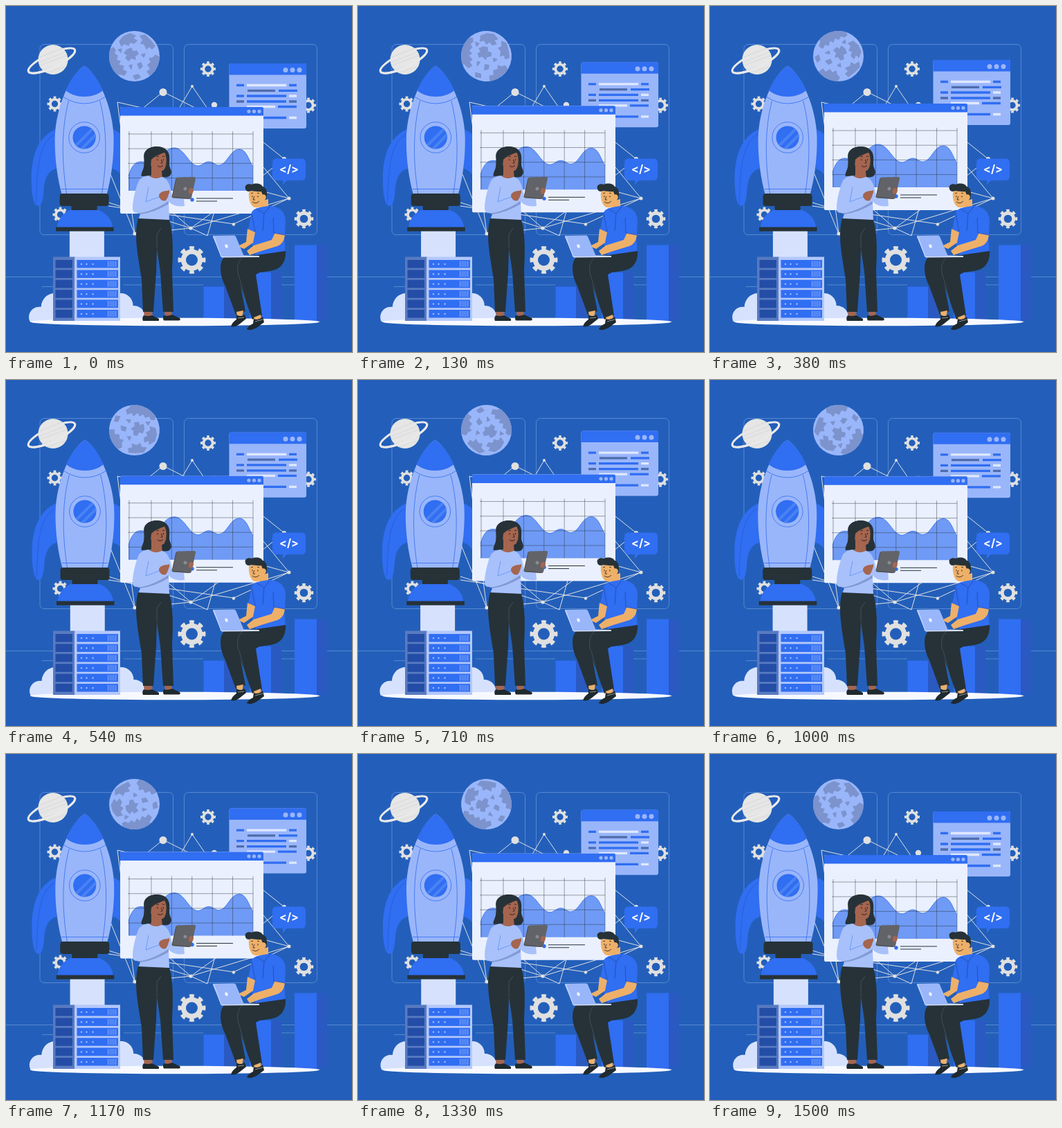
An HTML page for the animation above (1540 ms loop, 500 by 500 pixels).

```html
<!DOCTYPE html>
<html lang="en">
<head>
<meta charset="utf-8">
<title>Startup launch</title>
<style>
  html, body { margin: 0; width: 100%; height: 100%; overflow: hidden; background: #235fba; }
  svg { display: block; width: 100vw; height: 100vh; }
  .blue { fill: #306ef2; }
  .sky { fill: #9ab6fa; }
  .pale { fill: #d6e2fd; }
  .dark { fill: #263238; }
  .grey { fill: #e0e0e0; }
  .side { fill: #2a59c2; }
  .brown { fill: #a5654f; }
  .skin { fill: #eeb069; }
  .line { fill: none; stroke: #306ef2; stroke-width: .8; }
  .seam { fill: none; stroke: #1c3f94; stroke-width: .6; }
  .crease { fill: none; stroke: #53636b; stroke-width: .6; }
  .frame { fill: none; stroke: #6f98dc; stroke-width: .7; }
  .net { fill: none; stroke: #e0e0e0; stroke-width: 1; }
  text { font: 700 16px Inter, "Open Sans", sans-serif; fill: #fff; text-anchor: middle; }
</style>
</head>
<body>
<svg viewBox="0 0 500 500">
  <defs>
    <g id="gear" fill="none" stroke="#e0e0e0">
      <circle r="6.5" stroke-width="3.8"/>
      <circle r="9.100" stroke-width="3.400" pathLength="16" stroke-dasharray="1" stroke-dashoffset=".5"/>
    </g>
    <path id="fin" d="M73 178C50 187 38 210 37 247C37 268 39 285 45 288.500C52 291 54 280 55 265C56 250 61 238 73 235Z"/>
    <clipPath id="moonClip"><circle cx="185.500" cy="72.500" r="36.500"/></clipPath>
    <clipPath id="planetClip"><circle cx="68" cy="77.500" r="21.500"/></clipPath>
    <clipPath id="portClip"><circle cx="113.500" cy="190" r="16.800"/></clipPath>
  </defs>

  <g class="frame">
    <rect x="49" y="55.500" width="192.500" height="275" rx="6"/>
    <rect x="257.500" y="55.500" width="192" height="275" rx="6"/>
    <path d="M0 391.500H500M52 405.500H70M170 403H285M398 403H417"/>
  </g>

  <g id="planet">
    <ellipse cx="66" cy="79" rx="37" ry="10" transform="rotate(-25 66 79)" fill="none" stroke="#e9e9e9" stroke-width="3"/>
    <circle cx="68" cy="77.500" r="21.500" fill="#e6e6e6"/>
    <path clip-path="url(#planetClip)" d="M44 76L88 58M46 82L92 64M46 87L92 70M50 94L92 79M54 98L92 86" fill="none" stroke="#d8d8d8" stroke-width="1"/>
    <path d="M-37 0A37 10 0 0 0 37 0" transform="translate(66 79) rotate(-25)" fill="none" stroke="#e9e9e9" stroke-width="3"/>
  </g>

  <g id="moon">
    <circle cx="185.500" cy="72.500" r="36.500" class="sky"/>
    <g clip-path="url(#moonClip)" fill="#7c93cd" stroke="#7c93cd" stroke-width="1.500" stroke-linejoin="round">
      <path d="M149 64L155 60L158 64L156 69L161 72L159 78L165 80L162 85L170 87L168 92L174 95L171 100L164 98L158 101L149 88Z"/>
      <path d="M170 44L179 40L187 43L183 47L189 50L185 54L179 52L177 57L171 54L167 58L164 51Z"/>
      <path d="M175 63L181 61L183 66L189 65L191 69L186 73L187 77L181 75L177 79L173 75L176 71L171 68Z"/>
      <path d="M194 43L201 42L209 50L215 58L211 62L207 58L203 62L200 55L195 54L198 49Z"/>
      <path d="M222 74L216 71L212 75L207 76L210 81L205 85L209 91L204 95L208 100L216 94Z"/>
      <path d="M190 84L195 82L197 87L193 91ZM184 101L191 99L194 103L187 106ZM196 70L201 69L199 74ZM162 63L167 62L166 67ZM178 86L182 85L181 91Z"/>
    </g>
  </g>

  <use href="#gear" transform="translate(292 91) scale(1.020)"/>
  <use href="#gear" transform="translate(70.500 141.500) scale(1.020)"/>
  <use href="#gear" transform="translate(437 143.500) scale(1.020)"/>
  <use href="#gear" transform="translate(78.500 301.500) scale(1.020)"/>
  <use href="#gear" transform="translate(430.500 307.500) scale(1.270)"/>
  <use href="#gear" transform="translate(268.500 367) scale(1.850)"/>

  <path class="net" d="M186 329L148 236M186 329L161 139L205 149M195 150L227 124L275 148M250 148L269 116L291 148
    M148 284L267 321L409 278M148 289L329 315L409 278L350 262M186 329L267 321L291 332L303 290M267 321L225 285M267 321L310 290M186 329L225 290
    M409 278L372 233M372 197L402 221L370 246M402 221L432 250"/>
  <g class="grey">
    <circle cx="227" cy="124.500" r="5.500"/><circle cx="269" cy="116" r="2"/><circle cx="301" cy="143" r="4.200"/>
    <circle cx="186" cy="329" r="2.600"/><circle cx="267" cy="321" r="2.600"/><circle cx="329" cy="315.500" r="2.200"/>
    <circle cx="409" cy="278" r="2.500"/><circle cx="402" cy="221" r="3"/>
  </g>

  <g class="shake"><g transform="translate(-.4 0)">
    <path class="pale" d="M35 456C30 445 39 433 51 435C52 419 67 411 80 417L164 415C175 414 184 422 184 433C197 433 204 444 201 456Z"/>
    <path class="pale" d="M92.300 324H142.300V370H92.300Z"/>
    <use href="#fin" class="blue"/>
    <use href="#fin" class="blue" transform="matrix(-1 0 0 1 227 0)"/>
    <path class="seam" d="M70 186C52 196 45 220 44 284" opacity=".5"/>
    <path class="sky" d="M113.500 86.500C94 98 71 147 71 194C71 224 75 250 81 272H146C152 250 156 224 156 194C156 147 133 98 113.500 86.500Z"/>
    <path class="blue" d="M113.500 86.500C103 93 93 107 86.500 122C101 134 126 134 140.500 122C134 107 124 93 113.500 86.500Z"/>
    <path class="line" d="M82.500 131Q113.500 151 144.500 131M91 137C81 175 80 220 88 271M136 137C146 175 147 220 139 271M80 264.500H147"/>
    <circle cx="113.500" cy="190" r="22.300" class="sky"/>
    <circle cx="113.500" cy="190" r="22.300" class="line"/>
    <g clip-path="url(#portClip)">
      <circle cx="113.500" cy="190" r="16.800" class="blue"/>
      <path d="M98 205L129 174M107 209L134 182" stroke="#4a82f4" stroke-width="4"/>
    </g>
    <path class="blue" d="M95 294H132C147 299 154 310 154.500 321H74C75 310 81 299 95 294Z"/>
    <path class="dark" d="M95 286H132V295H95Z"/>
    <rect class="dark" x="78" y="271" width="71" height="18" rx="4"/>
    <path class="dark" d="M72.500 319.500H156V325.500H72.500Z"/>
  </g></g>

  <path class="side" d="M315 405.500H330V455H315ZM383 385H398V455H383ZM449 345.500H464V455H449Z"/>
  <path class="blue" d="M285.500 405.500H315V455H285.500ZM352 385H383V455H352ZM417 345.500H449V455H417Z"/>
  <ellipse cx="244" cy="456.500" rx="209" ry="5.800" fill="#f7f9ff"/>

  <g id="server">
    <path fill="#587ac0" d="M68 362.500H100V455H68Z"/>
    <path fill="#b3c8fb" d="M99 362.500H165V455H99Z"/>
  </g>

  <g class="float" id="code">
    <rect class="sky" x="322.500" y="83" width="111.500" height="94" rx="3"/>
    <path class="blue" d="M322.500 99.500V86Q322.500 83 325.500 83H431Q434 83 434 86V99.500Z"/>
    <g class="sky"><circle cx="404" cy="92.500" r="3.500"/><circle cx="414" cy="92.500" r="3.500"/><circle cx="424" cy="92.500" r="3.500"/></g>
    <g fill="none" stroke-width="3.300">
      <path stroke="#306ef2" d="M333 114.500H344M409 114.500H420M394 122.300H421M333 130H344M348 130H405M348 138H405M393 145.500H420M348 161.500H405"/>
      <path stroke="#dfe8fe" d="M348 114.500H405M409 130H420M348 145.500H389M409 161.500H420"/>
      <path stroke="#4f6cac" d="M349 122.300H389M333 138H344M409 138H420"/>
    </g>
  </g>

  <g class="float">
    <rect x="165" y="146" width="207" height="154" rx="2" fill="#eaf0fe"/>
    <path class="blue" d="M165 158.500V148Q165 146 167 146H370Q372 146 372 148V158.500Z"/>
    <g class="sky"><circle cx="351" cy="152.300" r="2.600"/><circle cx="358.500" cy="152.300" r="2.600"/><circle cx="366" cy="152.300" r="2.600"/></g>
    <path fill="#6f9af5" d="M177 267V246C182 228 189 225 195 225C207 225 211 233 218 226C226 216 232 205 243 205C258 205 264 230 277 231C284 231 286 225 293 225C300 225 302 231 309 230C320 228 324 207 337 207C348 207 351 224 357 232V267Z"/>
    <path class="line" d="M177 246C182 228 189 225 195 225C207 225 211 233 218 226C226 216 232 205 243 205C258 205 264 230 277 231C284 231 286 225 293 225C300 225 302 231 309 230C320 228 324 207 337 207C348 207 351 224 357 232"/>
    <path id="grid" fill="none" stroke="#263238" stroke-width=".45"/>
    <circle class="blue" cx="269" cy="280" r="2.700"/>
    <path d="M275 278H328M275 282H305" stroke="#263238" stroke-width="1"/>
  </g>

  <path class="blue" d="M391 220.500H427Q433 220.500 433 226.500V246Q433 252 427 252H406L400 258V252H391Q385 252 385 246V226.500Q385 220.500 391 220.500Z"/>
  <text x="409" y="241">&lt;/&gt;</text>

  <g id="woman">
    <path class="dark" d="M203 208C209 202 224 201 231 207C238 213 236 222 236 229C236 235 242 239 237 245C232 250 224 246 218 245L196 246C194 242 200 236 200 226C199 217 198 213 203 208Z"/>
    <path class="brown" d="M210 230L225 238L226 249L216 253L206 248L210 244Z M199 441H211L212 449H200Z M229 441H239L241 449H230Z"/>
    <path class="brown" d="M211 217C217 217 224 213 228 210C233 215 233 232 228 237C222 241 214 237 211 231C206 231 204 221 209 221Z"/>
    <path d="M219 221V223.500M227.500 221V223.500M219 231Q223 234 227 230.500M224.500 222L226 227H223.500M217 218L221 217M226 217L229 217.500" fill="none" stroke="#2b2222" stroke-width=".9"/>
    <path class="dark" d="M205 207C217 200 231 204 232 211C225 213 214 217 210 222L208 243L200 244C199 230 199 212 205 207Z"/>
    <path fill="#a8c1fb" d="M206 245C212 250 219 250 225 247C233 249 237 256 240 274L257 277L258 289C246 291 237 286 235 282L236 309H191L195 298L184 297C182 286 188 258 193 251C197 247 201 246 206 245Z"/>
    <path fill="#8299d4" d="M187 298Q214 295 235 282L235 286Q216 298 194 301Z"/>
    <path fill="#a8c1fb" d="M193 254C184 270 181 293 185 298C196 303 222 291 234 282L229 273L202 283L206 263Z"/>
    <path class="line" d="M206 262L202 283L229 273" opacity=".6"/>
    <path class="brown" d="M221 273C223 268 231 266 236 268L234 276L231 281C226 283 221 279 221 273Z"/>
    <path fill="#626368" d="M248 247.500L272 247Q274.500 247 274 249.500L268 277Q267.500 279 265 279L242 277.500Q239.500 277 240 275L245.500 250Q246 247.500 248 247.500Z"/>
    <path d="M246 249L240 276L265 278.500" fill="none" stroke="#45464a" stroke-width=".8"/>
    <circle cx="259" cy="264" r="2.500" fill="#8a8b90"/>
    <path class="brown" d="M264 265C266 262 271 262 271 267C270 272 266 273 264 270Z M230 268L236 266L236 271Z"/>
    <path class="dark" d="M191 307L236 309C241 325 242 352 240 382L242 442H227L223 384L218 350L217 385L213 442H198L196 395C191 362 184 330 191 307Z"/>
    <path class="crease" d="M218 350L218 330L224 321"/>
    <path fill="#1f292e" d="M199 447Q204 449 211 447L221 452V455H198Q196 451 199 447ZM228 447Q234 449 240 446L251 451Q253 454 250 454.500H228Q226 451 228 447Z"/>
  </g>

  <g id="man">
    <path class="skin" d="M364 283L379 279V293L368 297Z"/>
    <path class="skin" d="M351 268L371 265C377 268 378 275 374 278C373 288 367 292 360 291C353 290 350 278 351 268Z"/>
    <path class="dark" d="M346 264C344 258 351 256 355 258C362 255 369 257 371 261C378 263 378 273 376 280L372 276L369 268C362 269 356 266 351 268C348 268 346 266 346 264Z"/>
    <path class="skin" d="M369 274C372 270 378 274 375 279C373 282 369 281 369 278Z"/>
    <path d="M356 274V276.500M364 274V276.500M356 283Q361 287 366 282M359 275L357 280H360M354 271L357 270M363 270L366 271" fill="none" stroke="#3a2b22" stroke-width=".9"/>
    <path class="blue" d="M355 298C359 292 365 291 379 289C394 289 403 296 404 309L402 332L404 358L361 360C357 344 351 338 350 324Z"/>
    <path class="skin" d="M349 322L360 327L357 342L344 351L335 347L347 341Z"/>
    <g class="dark">
      <path d="M404 354C405 370 397 382 380 383L336 390L346 441L332 446L317 405C308 388 308 368 316 363L362 360Z"/>
      <path d="M362 360L390 372L361 388L370 447L356 453L343 416C334 392 330 376 335 367Z"/>
    </g>
    <path class="crease" d="M342 363C333 371 333 383 338 395L346 425"/>
    <path class="skin" d="M390 325L403 328C403 337 400 344 392 347L366 355L352 360L348 354L358 346L384 338Z"/>
    <path class="blue" d="M386 304L404 309L403 331L387 328Z"/>
    <path class="seam" d="M362 293L373 300L381 290M373 300L371 325M386 306L387 328L403 331M355 300L360 326"/>
    <path d="M310 361L343 360.500L366 361V363L312 363.500Z" fill="#cfdcfd"/>
    <path fill="#9ab6fa" d="M300 332L329 331.500Q331 331.500 332 333L344 361.500L311 362.500L299 334Q298.500 332 300 332Z"/>
    <path d="M300 332L311 362.500H366" fill="none" stroke="#dbe5fe" stroke-width=".9"/>
    <ellipse cx="318.500" cy="347" rx="2" ry="2.700" transform="rotate(-25 318.500 347)" fill="#f1f5ff"/>
    <path class="skin" d="M333 442L343 440L341 451L334 449Z M358 450L368 446L369 455L360 456Z"/>
    <path fill="#1f292e" d="M333 446Q338 450 345 446L347 452L337 460Q330 465 325 463Q327 457 333 453ZM358 452Q364 455 371 449L373 457L362 465Q353 470 348 467Q350 462 357 459Z"/>
    <path d="M335 451L344 450M360 456L371 453" stroke="#dfe4e6" stroke-width=".6"/>
  </g>
</svg>

<script>
  const SVG = 'http://www.w3.org/2000/svg';
  const addPath = (parent, d, attrs) => {
    const path = document.createElementNS(SVG, 'path');
    path.setAttribute('d', d);
    for (const key in attrs) path.setAttribute(key, attrs[key]);
    parent.append(path);
  };

  // Chart grid
  let grid = 'M178 181V267';
  for (let i = 0; i < 6; i++) grid += `M${357 - i * 29.4} 181V267`;
  for (let i = 0; i < 4; i++) grid += `M176 ${185 + i * 21.2}H357`;
  document.getElementById('grid').setAttribute('d', grid);

  // Server rows
  const server = document.getElementById('server');
  for (let i = 0; i < 6; i++) {
    const y = 367 + i * 14.4;
    addPath(server, `M71.500 ${y}H96V${y + 11.6}H71.500Z`, { fill: '#234da6' });
    addPath(server, `M102.500 ${y}H162V${y + 11.6}H102.500Z`, { fill: '#306ef2' });
    addPath(server, `M109 ${y + 6}h.01M116.500 ${y + 6}h.01M125.500 ${y + 6}h.01`,
      { stroke: '#9ab6fa', 'stroke-width': 2.6, 'stroke-linecap': 'round' });
    let vents = '';
    for (let x = 147.5; x < 160; x += 2.8) vents += `M${x} ${y + 1.5}v8.6`;
    addPath(server, vents, { stroke: '#9ab6fa', 'stroke-width': 0.9 });
  }

  // Motion runs at 24 steps per second
  const LOOP = 1540, STEP = 1000 / 24, LENGTH = 36;
  const shakeX = [0, -1, 2, -4, 4, -4, 4, -4, 2, -1, 0];
  const floatY = [0, -10, 0];
  const floaters = document.querySelectorAll('.float');
  const rocket = document.querySelector('.shake');
  const moon = document.getElementById('moon');

  const sample = (keys, p) => {
    const pos = p * (keys.length - 1);
    const i = Math.min(Math.floor(pos), keys.length - 2);
    return keys[i] + (keys[i + 1] - keys[i]) * (pos - i);
  };

  const start = performance.now();
  function draw() {
    const time = (performance.now() - start) % LOOP;
    const p = Math.min(Math.floor((time + 4) / STEP), LENGTH) / LENGTH;
    rocket.setAttribute('transform', `translate(${sample(shakeX, p)} 0)`);
    moon.setAttribute('transform', `rotate(${360 * p} 185.5 72.5)`);
    floaters.forEach(el => el.setAttribute('transform', `translate(0 ${sample(floatY, p)})`));
    requestAnimationFrame(draw);
  }
  draw();
</script>
</body>
</html>
```
